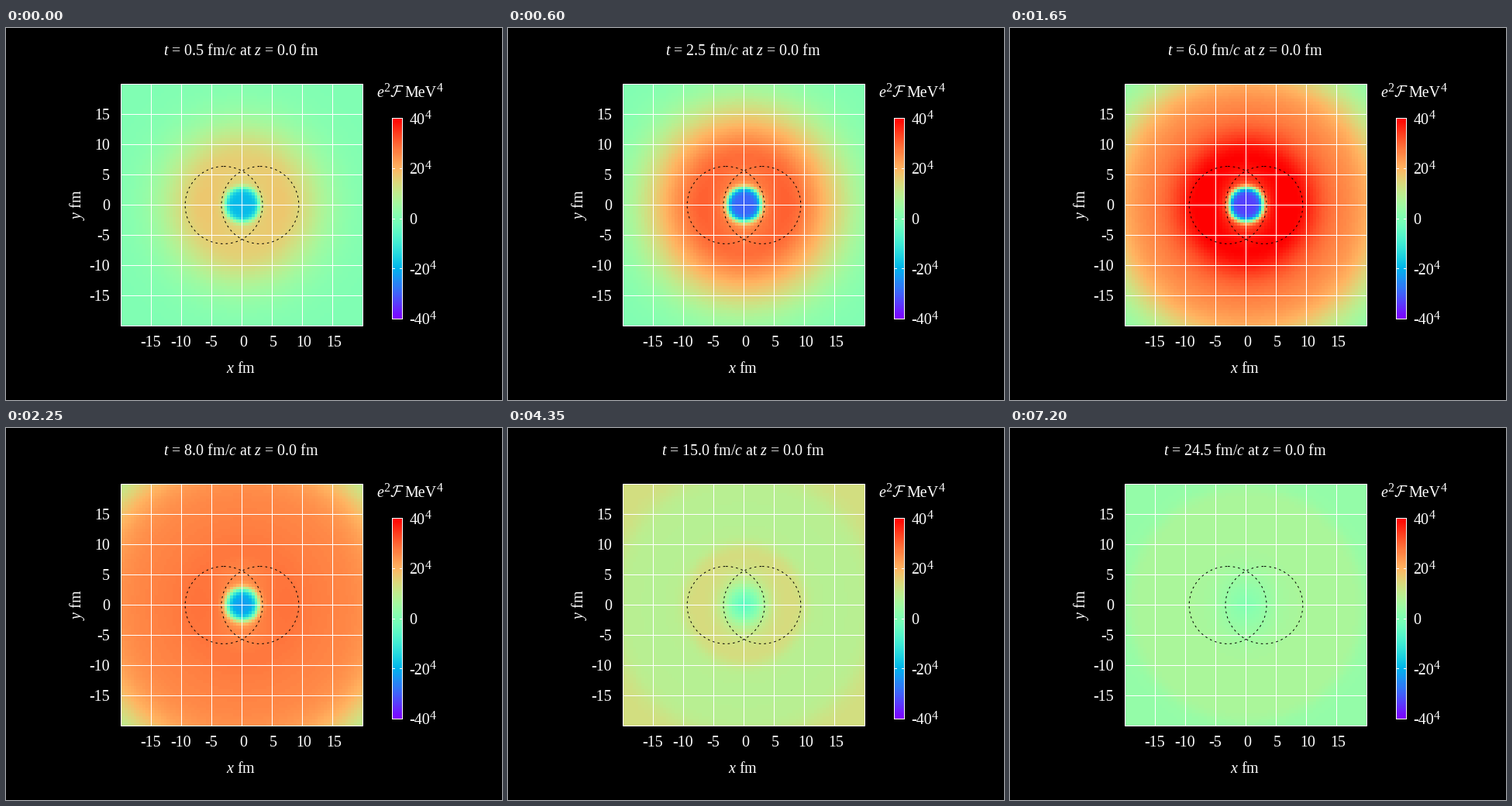
These frames come from a looping animation (640 by 480 pixels, 7.35 s). A matplotlib script:

```python
import numpy as np
import matplotlib.pyplot as plt
from matplotlib.animation import FuncAnimation
from matplotlib.patches import Circle, Rectangle

plt.rcParams.update({
    "font.family": "Liberation Serif",
    "mathtext.fontset": "custom",
    "mathtext.rm": "Liberation Serif",
    "mathtext.it": "Liberation Serif:italic",
})

W, H, DPI = 640, 480, 100
PX = 72 / DPI                        # points per pixel
FRAMES, STEP_MS = 49, 150
CX, CY, SCALE = 304.5, 228.5, 7.8    # plot centre, pixels per fm
HALF = 20 * SCALE
TICKS = range(-15, 16, 5)
BAR_X, BAR_Y, BAR_W, BAR_H = 498.5, 116.5, 13, 259

cells = np.arange(-19.75, 20, 0.5)
gx, gy = np.meshgrid(cells, cells)
rad = np.hypot(gx, gy)
bump = np.exp(-((rad - 7) / 5) ** 2)
squash = 1 - 0.07 * (gy / rad) ** 2 * np.exp(-((rad - 5) / 3) ** 2)


def inside(radius, width):
    """1 within the radius, 0 beyond it, with a soft edge."""
    return 1 / (1 + np.exp((rad - radius) / width))


def field(t):
    """Signed fourth root of the field in MeV at time t in fm/c."""
    fade = np.exp(-max(t - 7.5, 0) / 10)
    late = np.clip((t - 8) / 3, 0, 1)

    # Plateau behind the outgoing front, with a peak around the nuclei
    ring = 28 * (1 - np.exp(-(t + 1) / 2.1)) * fade * inside(12 + 1.85 * t, 2.6)
    ring += (3 + 1.9 * t) * np.exp(-(max(t - 6, 0) / 1.3) ** 2) * bump

    # Two later waves leaving at the speed of light
    ring *= 1 - 0.34 * late * inside(t + 7, 1)
    ring += 6 * late * np.exp(-max(t - 11, 0) / 25) * inside(t - 5, 0.6)
    ring *= squash

    # Negative core
    depth = 34 * (1 - np.exp(-(t + 0.9) / 1.7)) * np.exp(-max(t - 6, 0) / 5)
    radius = 2.8 - 1.5 * np.exp(-((t - 11) / 2.2) ** 2)
    core = inside(radius, 0.3 + 0.085 * max(t - 7, 0))
    return ring * (1 - core) - depth * core


fig = plt.figure(figsize=(W / DPI, H / DPI), dpi=DPI, facecolor="black")
ax = fig.add_axes([0, 0, 1, 1])
ax.axis("off")


def label(x, y, s, size=20, ha="left", **kw):
    return ax.text(x, y, s, fontsize=size * PX, color="white",
                   ha=ha, va="baseline", **kw)


def line(xs, ys):
    ax.plot(xs, ys, color="white", lw=PX, snap=False, zorder=2)


def panel(data, x, y, w, h):
    ax.add_patch(Rectangle((x, y), w, h, fill=False, ec="white", lw=PX,
                           snap=False, zorder=3))
    return ax.imshow(data, cmap="rainbow", vmin=-40, vmax=40,
                     extent=(x, x + w, y + h, y), interpolation="nearest",
                     aspect="auto", zorder=1)


# Field map with grid and the two nuclei
image = panel(field(0.5), CX - HALF, CY - HALF, 2 * HALF, 2 * HALF)
for v in TICKS:
    x, y = CX + v * SCALE, CY - v * SCALE
    line([x, x], [CY - HALF, CY + HALF])
    line([CX - HALF, CX + HALF], [y, y])
    label(x + (1.5 if v >= 0 else -1), 411, str(v), ha="center")
    label(134, y + 6.5, str(v), ha="right")
for side in (-3, 3):
    ax.add_patch(Circle((CX + side * SCALE, CY), 6.4 * SCALE, fill=False,
                        ec="black", lw=PX, ls=(0, (2.6, 4)), zorder=4))

# Colour bar
panel(np.linspace(40, -40, 256)[:, None], BAR_X, BAR_Y, BAR_W, BAR_H)
for v in range(-40, 41, 20):
    y = BAR_Y + BAR_H * (40 - v) / 80
    tick = np.floor(y) + 0.5
    line([BAR_X, BAR_X + 3], [tick, tick])
    line([BAR_X + BAR_W - 3, BAR_X + BAR_W], [tick, tick])
    label(520.5, y + 7, str(v))
    if v:
        label(540.5 if v > 0 else 547, y + 0.5, "4", 16)

label(478.5, 89, "e", style="italic")
label(487.5, 81.5, "2", 16)
label(495, 89, r"$\mathcal{F}$", math_fontfamily="cm")
label(514.5, 89, "MeV")
label(555.5, 81.5, "4", 16)

label(303, 445, r"$\mathit{x}$ fm", ha="center")
label(97, 228, r"$\mathit{y}$ fm", ha="center", rotation=90,
      rotation_mode="anchor")
title = label(303.5, 35, "", ha="center")

ax.set_xlim(0, W)
ax.set_ylim(H, 0)


def draw(k):
    t = 0.5 + 0.5 * k
    image.set_data(field(t))
    title.set_text(rf"$\mathit{{t}}$ = {t:.1f} fm/$\mathit{{c}}$"
                   r" at $\mathit{z}$ = 0.0 fm")
    return image, title


anim = FuncAnimation(fig, draw, frames=FRAMES, interval=STEP_MS,
                     repeat=True, repeat_delay=0, blit=False)
plt.show()
```
